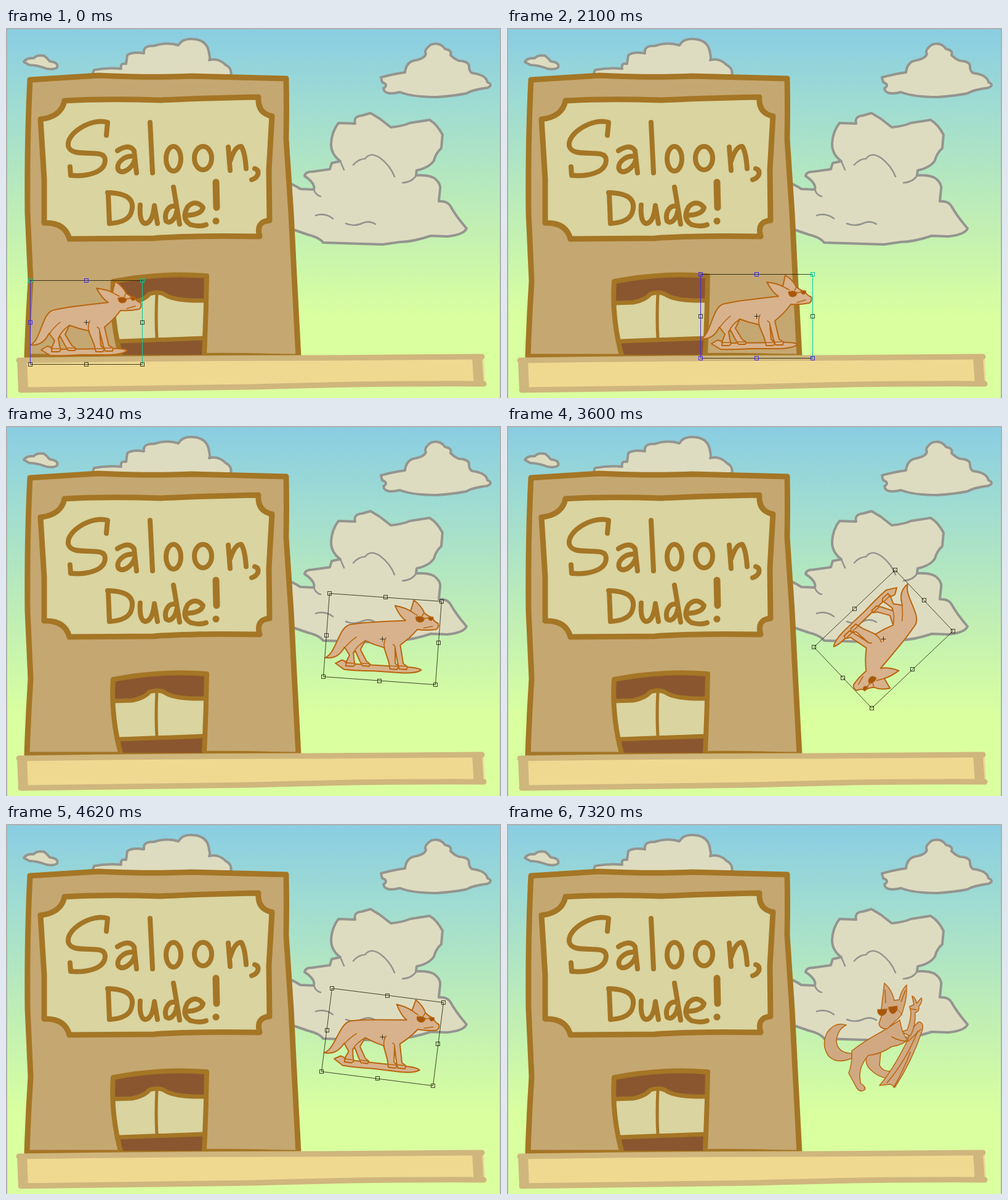
These frames come from a looping animation (804 by 600 pixels, 8000 ms). An HTML page:

```html
<!DOCTYPE html>
<html lang="en">
<head>
<meta charset="utf-8">
<title>Surfing fox</title>
<style>
  html, body { margin: 0; width: 100%; height: 100%; overflow: hidden; }
  svg { display: block; width: 804px; height: 600px; stroke-linecap: round; stroke-linejoin: round; }
  .cloud { fill: #dedcc0; stroke: #94958f; stroke-width: 4; }
  .fold { fill: none; stroke-width: 2.6; }
  .wood { stroke: #a47625; stroke-width: 9; }
  .letters { fill: none; stroke: #a47625; stroke-width: 8; }
  .fox { fill: #d7b28d; stroke: #b9660f; stroke-width: 2; }
  .line { fill: none; stroke-width: 1.6; }
  .shade { fill: #a6570c; stroke-width: 1; }
  #pose { fill: #d0a983; stroke-width: 1.5; }
  #ants { fill: none; stroke: #111; stroke-dasharray: 5 4; stroke-linecap: butt; }
  #box { fill: none; stroke-width: 1; stroke-linecap: butt; stroke-linejoin: miter; }
</style>
</head>
<body>
<svg viewBox="0 0 804 600">
  <defs>
    <linearGradient id="sky" x2="0" y2="1">
      <stop offset="0" stop-color="#89cde3"/>
      <stop offset=".2" stop-color="#9edbd3"/>
      <stop offset=".5" stop-color="#beedb6"/>
      <stop offset=".78" stop-color="#d9ff9f"/>
      <stop offset="1" stop-color="#dbff9f"/>
    </linearGradient>
    <path id="board" d="M-73 45L-63 39Q-54 42 -44 44L40 43Q60 42 67 46Q60 52 38 53L-10 53Q-40 55 -58 54Z"/>
    <path id="body" d="M-90 37C-72 28 -72 -18 -51 -20L-30 -24Q0 -28 36 -32Q26 -38 17 -55Q33 -53 43 -48L47 -66Q60 -58 65 -47Q71 -42 79 -40Q81 -34 89 -31Q91 -24 86 -21Q70 -18 56 -19Q45 -4 30 8L37 38L44 42L43 47L31 47L28 38L22 14L24 38L30 44L27 48L16 48L13 36L4 14Q-12 11 -27 5L-34 20L-23 38L-17 42L-18 46L-29 46L-34 38L-42 23L-45 26L-43 38L-41 45L-44 48L-56 48L-55 40L-51 30L-60 18Q-70 39 -90 37Z"/>
  </defs>

  <rect width="804" height="600" fill="url(#sky)"/>

  <g class="cloud">
    <path d="M29 55Q33 48 45 49Q50 43 62 45Q68 50 71 54Q86 56 83 64Q78 68 66 66Q50 60 38 60Z"/>
    <path d="M140 77L143 68Q165 64 187 66Q185 56 195 58L197 44Q205 38 224 41Q222 28 240 29Q262 22 280 28Q287 16 305 18Q328 20 330 42Q332 50 330 52Q345 48 357 60Q368 66 365 77Z"/>
    <path d="M609 80Q632 74 648 72Q650 56 662 53Q680 50 682 42Q678 36 690 27Q705 22 713 34Q725 36 722 44Q728 50 735 53Q752 54 752 62Q752 70 757 73Q780 76 782 88Q792 92 782 97Q758 100 748 106Q728 110 700 112Q660 112 640 104Q615 110 613 98Q622 92 611 88Z"/>
    <path d="M455 250Q468 254 478 261L500 262Q503 252 485 240Q486 233 497 233L526 229L529 219L543 216Q528 205 528 188Q529 168 540 154L567 155Q564 143 578 142L592 138L607 147L625 161Q645 159 656 154L688 149Q700 156 709 173L707 195Q698 203 695 215Q688 226 667 231L666 239Q685 238 695 243Q707 252 705 262L703 281Q717 280 722 289Q730 304 748 325Q744 335 717 338L690 337Q660 347 640 347L612 351L515 348Q510 340 490 335L458 324Z"/>
    <path class="fold" d="M543 216L549 230M564 222Q573 212 583 212Q592 200 608 211Q624 223 631 241M644 251Q660 250 667 238M500 262Q503 271 511 273M503 304Q518 299 531 309M552 317Q566 323 580 316Q590 312 600 318"/>
  </g>

  <g class="wood">
    <path fill="#c5a771" d="M39 84Q90 81 150 77Q240 81 300 78Q380 80 455 82Q456 130 455 180L463 300L468 400L475 533L34 533Q36 470 40 410L35 300Q34 180 39 84Z"/>
    <path fill="#d9d4a0" d="M95 118Q160 114 250 117Q340 113 410 112Q408 138 432 143L427 230L428 312Q405 314 412 338Q300 336 240 341L103 342Q96 315 62 316L62 245L56 148Q90 144 95 118Z"/>
  </g>

  <g class="letters" role="img" aria-label="Saloon, Dude!">
    <path d="M163 174L165 153C140 145 98 170 101 191C106 214 161 192 161 214C161 236 128 241 105 239L104 225"/>
    <path d="M181 199Q200 187 208 199L212 235M209 208C190 206 177 221 183 231C192 238 206 225 209 214M234 153L238 235"/>
    <ellipse cx="272" cy="212" rx="12" ry="20"/>
    <ellipse cx="320" cy="211" rx="14" ry="19"/>
    <path d="M361 193L364 231M364 216Q372 191 382 192Q388 200 390 228M404 228Q411 230 409 238Q406 244 399 246"/>
    <path d="M166 268L168 317M165 267Q212 268 204 297Q200 315 168 317M218 287Q216 315 226 317Q238 316 241 288L246 317M272 258L282 318M277 290C265 284 256 300 260 313C268 320 276 306 277 298"/>
    <path d="M291 304Q318 303 320 291Q308 277 295 290Q284 310 300 319Q315 323 325 319"/>
    <path stroke-width="11" d="M341 250L342 291M341 313h.1"/>
  </g>

  <path fill="#8a562f" d="M175 411Q250 398 326 402L322 530L187 530Q176 500 175 411Z"/>
  <path fill="#d9d4a0" d="M173 446L205 446Q225 441 233 429Q250 424 259 434Q275 444 323 442L322 504L184 508Z"/>
  <g class="wood" fill="none">
    <path stroke-width="7" d="M174 446L205 445Q225 441 233 431Q250 426 259 433Q275 443 323 442M184 508L320 503"/>
    <path stroke-width="5" d="M245 430Q243 470 245 504"/>
    <path stroke-width="8" d="M186 530Q170 470 174 411Q250 396 326 402Q325 465 322 528"/>
    <path stroke-width="4" d="M322 529Q400 528 475 532"/>
  </g>

  <path fill="#efd991" d="M18 536L776 530L778 580Q600 578 400 585L22 590Z"/>
  <g fill="none" stroke="#cfb67d">
    <path stroke-width="9" d="M21 539Q300 535 500 535L773 533M24 587L400 582Q600 576 776 577"/>
    <path stroke-width="16" stroke-linecap="butt" d="M26 537L28 589M765 532L768 580"/>
  </g>

  <g id="fox" class="fox">
    <use href="#board"/>
    <use href="#body"/>
    <path class="line" d="M-42 0Q-52 8 -59 18M-27 5Q-40 14 -45 26M6 -2Q2 7 5 15M18 8Q23 10 22 16M43 -48Q48 -45 54 -42M-57 43h14M-30 42h11M15 43h12M30 42h11M65 -47L62 -41M66 -22L80 -26"/>
    <path class="shade" d="M52 -39Q60 -42 66 -38Q66 -31 58 -31Q52 -32 52 -39ZM72 -40L80 -41Q82 -37 77 -35Q73 -35 72 -40Z"/>
    <path class="line" d="M64 -37L73 -39"/>
    <g id="ants"><use href="#board"/><use href="#body"/></g>
  </g>

  <g id="pose" class="fox">
    <path d="M560 372Q535 371 535 350Q538 332 551 326Q533 320 520 338Q510 358 522 376Q535 390 560 380Z"/>
    <path d="M585 374Q580 388 590 398Q604 412 622 413Q630 404 623 401Q609 401 605 391L607 370Z"/>
    <path d="M605 424Q626 400 650 352Q658 328 669 321Q678 322 674 336Q658 384 630 427L623 422Z"/>
    <path class="line" d="M617 420Q648 384 667 336M628 427Q644 400 655 370"/>
    <path d="M640 337L650 334Q656 318 656 305L654 296L661 293L658 279Q664 282 665 291L673 282Q676 286 669 296Q670 304 663 306Q664 328 655 344Z"/>
    <path d="M560 368Q580 352 610 336L638 318Q641 338 650 350Q644 358 625 361Q605 374 587 375Q574 390 573 406L574 420Q584 427 581 431Q574 436 568 428L555 404Q561 388 560 368Z"/>
    <path class="line" d="M625 345Q638 353 652 352L672 333"/>
    <path d="M608 300L613 258Q625 268 629 286L637 285Q640 270 649 261Q650 282 644 299Q642 312 630 320L618 332Q606 333 604 324L609 309Z"/>
    <path class="line" d="M615 290L614 269M640 288L647 270M655 300L665 301"/>
    <path class="shade" d="M602 301L617 300Q617 310 608 311Q601 309 602 301ZM620 297L634 295Q635 305 627 308Q620 306 620 297ZM616 301L621 299M634 300L642 310"/>
  </g>

  <g id="box" transform="translate(.5 .5)"></g>
  <path d="M1 600V1H803V600" fill="none" stroke="#b0b0b0" stroke-width="2"/>
</svg>
<script>
const el = id => document.getElementById(id);
const fox = el('fox'), ants = el('ants'), pose = el('pose'), box = el('box');
const DARK = 'rgba(20,20,0,.78)', BLUE = '#3c28f0', CYAN = '#00c8a0';
const PERIOD = 8000, STEP = 60;

const set = (node, attrs) => {
  for (const key in attrs) node.setAttribute(key, attrs[key]);
};
const add = (tag, attrs = {}) => {
  const node = document.createElementNS('http://www.w3.org/2000/svg', tag);
  set(node, attrs);
  return box.appendChild(node);
};
const show = (node, on) => { node.style.display = on ? '' : 'none'; };

// Corners and edge midpoints, clockwise from the top left.
const spots = [[-1, -1], [0, -1], [1, -1], [1, 0], [1, 1], [0, 1], [-1, 1], [-1, 0]];
const edges = [0, 2, 4, 6].map(() => add('path'));
const handles = spots.map(() => add('rect', { width: 6, height: 6 }));
const cross = add('path', { stroke: DARK });

// Share of a stepped move done at time t.
const done = (t, start, steps) =>
  Math.min(Math.max(Math.floor((t - start) / STEP) + 1, 0), steps) / steps;
// Slow start and soft landing; a larger pull lands earlier.
const glide = (u, pull) => 1 - (1 - u ** 1.9) ** pull;

function place(t) {
  return {
    x: Math.round(130 + 481 * glide(done(t, 1320, 25), 2.1)),
    y: Math.round(477 - 10 * done(t, 1320, 6) - 122 * glide(done(t, 2160, 11), 2.5)),
    angle: 367 * glide(done(t, 3240, 24), 4.6)
  };
}

function drawBox(t, { x, y, angle }) {
  const a = angle * Math.PI / 180, c = Math.cos(a), s = Math.sin(a);
  const pts = spots.map(([i, j]) => [
    Math.round(x + 91 * i * c - 68 * j * s),
    Math.round(y + 91 * i * s + 68 * j * c)
  ]);
  const low = t < 2160;
  const blue = t < 1320 ? [1, 7] : low ? [0, 1, 4, 5, 6] : [];
  const cyan = t < 1320 ? [0, 2] : low ? [2] : [];
  handles.forEach((h, i) => set(h, {
    x: pts[i][0] - 3, y: pts[i][1] - 3,
    stroke: blue.includes(i) ? BLUE : cyan.includes(i) ? CYAN : DARK
  }));
  edges.forEach((e, i) => set(e, {
    d: `M${pts[2 * i]}L${pts[(2 * i + 2) % 8]}`,
    stroke: !low ? DARK : i === 1 ? CYAN : i === 3 ? BLUE : DARK
  }));
  set(cross, { d: `M${x - 4} ${y}h8M${x} ${y - 4}v8` });
}

function draw(t) {
  const p = place(t);
  set(fox, { transform: `translate(${p.x} ${p.y}) rotate(${p.angle})` });
  drawBox(t, p);
  show(box, t < 5760);
  show(fox, t < 6840);
  show(ants, t >= 5760);
  ants.style.strokeDashoffset = t < 6060 ? 0 : t < 6240 ? 3 : 6;
  show(pose, t >= 7320);
}

const begin = performance.now();
function tick() {
  draw((performance.now() - begin) % PERIOD);
  requestAnimationFrame(tick);
}
tick();
</script>
</body>
</html>
```
